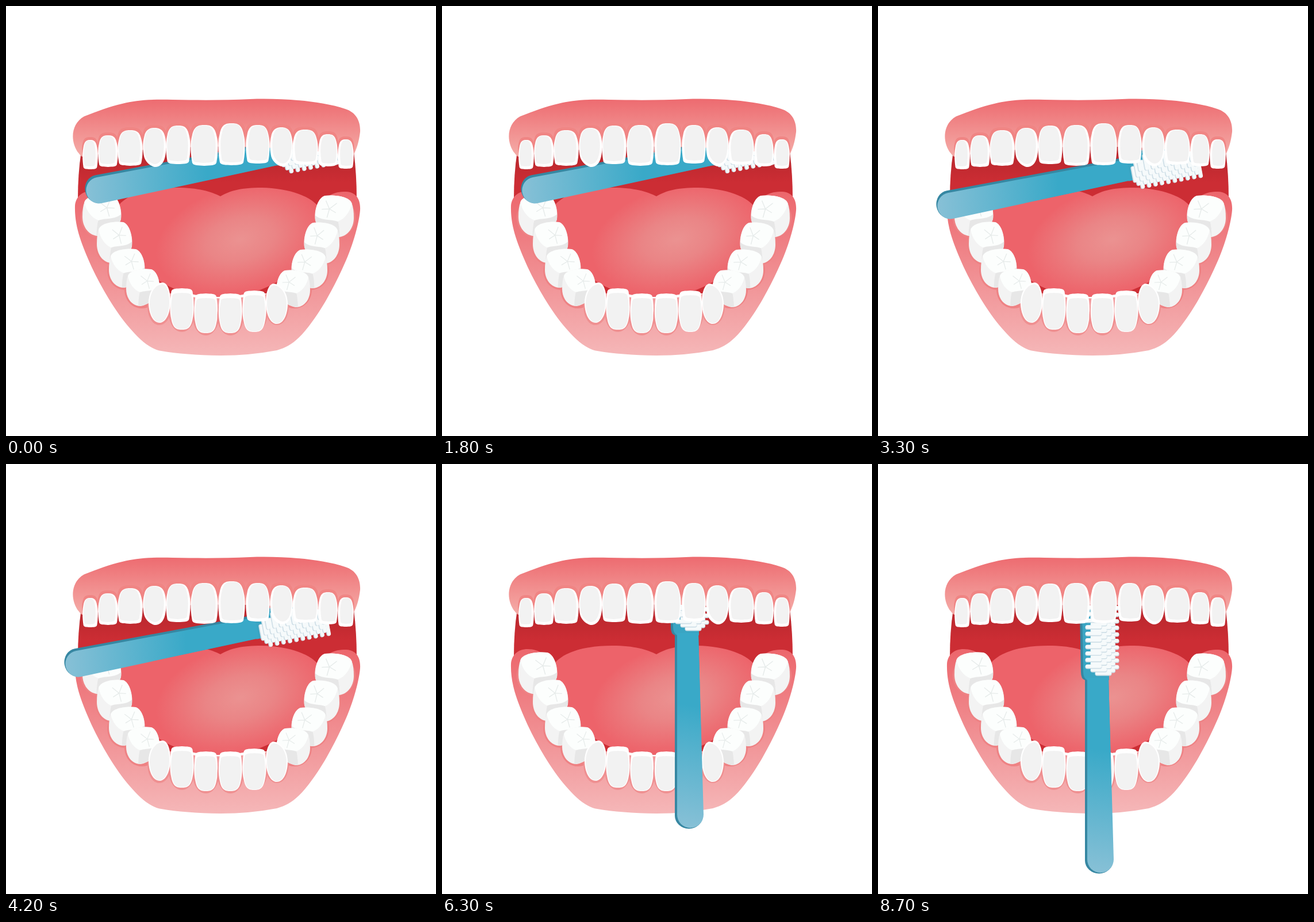
Recreate the animation shown at these times as an HTML page. Size 748 by 748 pixels, loop 9 s.

```html
<!DOCTYPE html>
<html lang="en">
<head>
<meta charset="utf-8">
<title>Brushing teeth</title>
<style>
  html, body { margin: 0; width: 100%; height: 100%; overflow: hidden; background: #fff; }
  svg { display: block; width: 100vw; height: 100vh; }
</style>
</head>
<body>
<svg viewBox="0 0 748 748">
  <defs>
    <linearGradient id="throat" gradientUnits="userSpaceOnUse" x1="0" y1="255" x2="0" y2="335">
      <stop offset=".2" stop-color="#be292f"/><stop offset=".65" stop-color="#cc2d34"/>
    </linearGradient>
    <linearGradient id="upperFill" gradientUnits="userSpaceOnUse" x1="0" y1="161" x2="0" y2="256">
      <stop offset="0" stop-color="#ed6a6f"/><stop offset="1" stop-color="#f4a9a5"/>
    </linearGradient>
    <linearGradient id="lowerFill" gradientUnits="userSpaceOnUse" x1="0" y1="322" x2="0" y2="608">
      <stop offset="0" stop-color="#ec666c"/><stop offset="1" stop-color="#f5b7b8"/>
    </linearGradient>
    <radialGradient id="tongueFill" gradientUnits="userSpaceOnUse" cx="0" cy="0" r="1"
      gradientTransform="translate(408 406) rotate(-14) scale(150 92)">
      <stop offset="0" stop-color="#eb9291"/><stop offset=".4" stop-color="#ea8586"/>
      <stop offset="1" stop-color="#ed636a"/>
    </radialGradient>
    <linearGradient id="handleFill" gradientUnits="userSpaceOnUse" x1="368" y1="705" x2="402" y2="500">
      <stop offset="0" stop-color="#86c0d6"/><stop offset="1" stop-color="#39a9c8"/>
    </linearGradient>
  </defs>

  <path fill="url(#throat)" d="M133 240Q125 285 125 335L240 500H500L610 335Q610 285 603 240Z"/>
  <path fill="url(#tongueFill)" d="M190 356C205 325 255 316 296 316C335 316 357 323 373 331
    C390 321 410 316 445 316C490 317 535 330 548 356C540 440 475 506 370 506C270 506 205 445 190 356Z"/>
  <path fill="url(#lowerFill)" d="M120 348C121 332 132 322 149 322C160 322 168 325 176 330L198 375
    C210 430 235 478 290 502Q370 515 450 502C505 478 530 430 542 375L562 330C572 324 580 323 592 323
    C609 324 617 336 616 355C614 380 602 422 585 457C565 500 545 535 522 563C505 584 490 594 471 599
    Q424 608 373 608Q311 607 270 600C248 596 231 578 215 560C190 531 167 492 149 454C132 415 119 385 120 348Z"/>
  <g id="lowerTeeth"></g>

  <g id="brush">
    <path fill="#3687a2" d="M351 258Q351 246 360 246H392Q402 248 402 260L401 370L409 690A24 22 0 0 1 360 690V376Q353 374 353 362Z"/>
    <path fill="#3aa5c3" d="M355 258Q355 248 364 247H392Q402 248 402 260V376H364Q357 372 357 362Z"/>
    <path fill="url(#handleFill)" d="M364 372H401L410 688A23 23 0 0 1 364 688Z"/>
    <g id="bristles" stroke-linecap="round"></g>
  </g>

  <path fill="url(#upperFill)" d="M132 262C112 245 109 207 136 192C159 183 180 175 202 170
    C226 164 249 162 290 163C338 164 382 164 424 162C482 160 548 165 590 179C610 185 617 202 616 219
    C614 235 611 247 604 260Q369 228 132 262Z"/>
  <g id="upperTeeth"></g>
</svg>
<script>
const byId = id => document.getElementById(id);

// Unit shapes, stretched into each tooth's box
const incisor = 'M.06 .92C0 .7-.02 .45.06 .25C.13 .02.3 0 .5 0C.7 0 .87 .02.94 .25C1.02 .45 1 .7.94 .92C.92 1 .7 .99.5 1C.3 .99.08 1 .06 .92Z';
const canine = 'M.06 .75C0 .6-.02 .4.06 .22C.13 .02.35 0 .5 0C.65 0 .87 .02.94 .22C1.02 .4 1 .6.94 .75C.87 .93.7 1 .54 1C.38 1 .14 .9.06 .75Z';
const oval = 'M.66 0C.9 .02 1 .25 1 .47C1 .75.8 1 .5 1C.18 1 0 .75 0 .5C0 .22.3 0 .66 0Z';

const fit = (d, fill, x0, x1, y0, y1, flip) => {
  const h = y1 - y0;
  return `<path d="${d}" fill="${fill}" transform="translate(${x0} ${flip ? y1 : y0}) scale(${x1 - x0} ${flip ? -h : h})"/>`;
};

// x0, x1, top, bottom
const upper = [
  [133, 160, 233, 284], [160, 195, 225, 280], [194, 238, 216, 278], [238, 279, 212, 280],
  [278, 321, 208, 275], [321, 369, 207, 278], [369, 416, 204, 277], [417, 459, 207, 274],
  [459, 499, 211, 279], [498, 543, 215, 276], [543, 577, 223, 279], [577, 605, 232, 283]
];
byId('upperTeeth').innerHTML =
  upper.map(([a, b, c]) => fit(incisor, '#f08584', a - 1, b + 1, c - 5, c + 32)).join('') +
  upper.map(([a, b, c, d], i) => {
    const shape = i === 3 || i === 8 ? canine : incisor;
    const left = i < 6 ? 2 : 4;
    return fit(shape, '#fff', a, b, c, d) + fit(shape, '#f2f2f2', a + left, b - 6 + left, c + 1, d - 5);
  }).join('');

function molar(x, y, w, h) {
  const star = [0, 1, 2, 3, 4].map(i => {
    const a = -1.2 + i * 1.2566, r = i % 2 ? 12 : 15;
    return `M38 23l${r * Math.cos(a)} ${r * Math.sin(a)}`;
  }).join('');
  return `<g transform="translate(${x} ${y}) scale(${w / 60} ${h / 70})">
    <path fill="#f3f3f3" d="M3 14C6 2 30-1 45 1C58 6 62 30 60 42C57 54 40 68 26 70C10 70 0 55 0 38Q0 22 3 14Z"/>
    <path fill="#e7e7e7" d="M25 42L60 33V42C57 54 40 69 22 70Q22 55 25 42Z"/>
    <path fill="#fcfefd" d="M3 14C6 2 30-1 45 1C55 4 60 22 60 34C50 43 35 40 25 44C14 40 6 28 3 14Z"/>
    <path d="${star}" fill="none" stroke="#e6ebea" stroke-width="1.3"/></g>`;
}

const molars = [[133, 327, 67, 73], [158, 375, 61, 72], [179, 422, 62, 68], [209, 457, 58, 65]];
const front = [[248, 286, 481, 551], [285, 327, 491, 563], [327, 368.5, 500, 569]];

function lowerHalf(lifts) {
  const gums = molars.map(([x, y, w, h]) => fit(oval, '#ee8284', x - 3, x + w, y + 4, y + h + 4)).join('') +
    front.map(([a, b, c, d]) => fit(oval, '#ef9091', a - 2, b + 2, c + 8, d + 4)).join('');
  const back = molars.map(([x, y, w, h], i) => molar(x, y + lifts[i], w, h)).join('');
  const teeth = front.map(([a, b, c, d], i) => {
    const shape = i ? incisor : oval, dy = lifts[4 + i];
    return fit(shape, '#fff', a, b, c + dy, d + dy, i > 0) +
      fit(shape, '#f2f2f2', a + 2, b - 2, c + dy + (i ? 8 : 3), d + dy - 1, i > 0);
  }).join('');
  return gums + back + teeth;
}
byId('lowerTeeth').innerHTML = lowerHalf([0, 0, 0, 0, 0, 0, 0]) +
  `<g transform="translate(738) scale(-1 1)">${lowerHalf([2, 1, 1, 2, 2, 4, 0])}</g>`;

// Staggered columns of tufts, the nearest column last
const columns = [[416, 353], [409.5, 359], [403, 364], [395, 358], [386, 352]];
byId('bristles').innerHTML = columns.map(([x, y]) =>
  Array.from({ length: 10 }, (_, i) => {
    const line = (dy, color, width) =>
      `<path d="M${x - 22} ${y - 11.4 * i + dy}h22" stroke="${color}" stroke-width="${width}"/>`;
    return line(.8, '#cfdfe7', 7.2) + line(-.3, '#f6fafb', 6);
  }).join('')).join('');

// Each stop: frames from `start`, resting offset, upward travel, tilt
const stops = [
  { start: 0, x: 36, y: 3, lift: 30, slanted: true },
  { start: 9, x: 0, y: 0, lift: 30, slanted: true },
  { start: 18, x: 45, y: -5, lift: 73, slanted: false },
  { start: 24, x: 0, y: 0, lift: 73, slanted: false }
];

function draw() {
  const frame = Math.floor(performance.now() / 300) % 30;
  const stop = stops.filter(s => s.start <= frame).pop();
  const y = stop.y - stop.lift * (1 - frame % 3 / 2);
  const tilt = stop.slanted ? 'translate(102 348) rotate(79.4) translate(-383 -712)' : '';
  byId('brush').setAttribute('transform', `translate(${stop.x} ${y}) ${tilt}`);
  requestAnimationFrame(draw);
}
draw();
</script>
</body>
</html>
```
